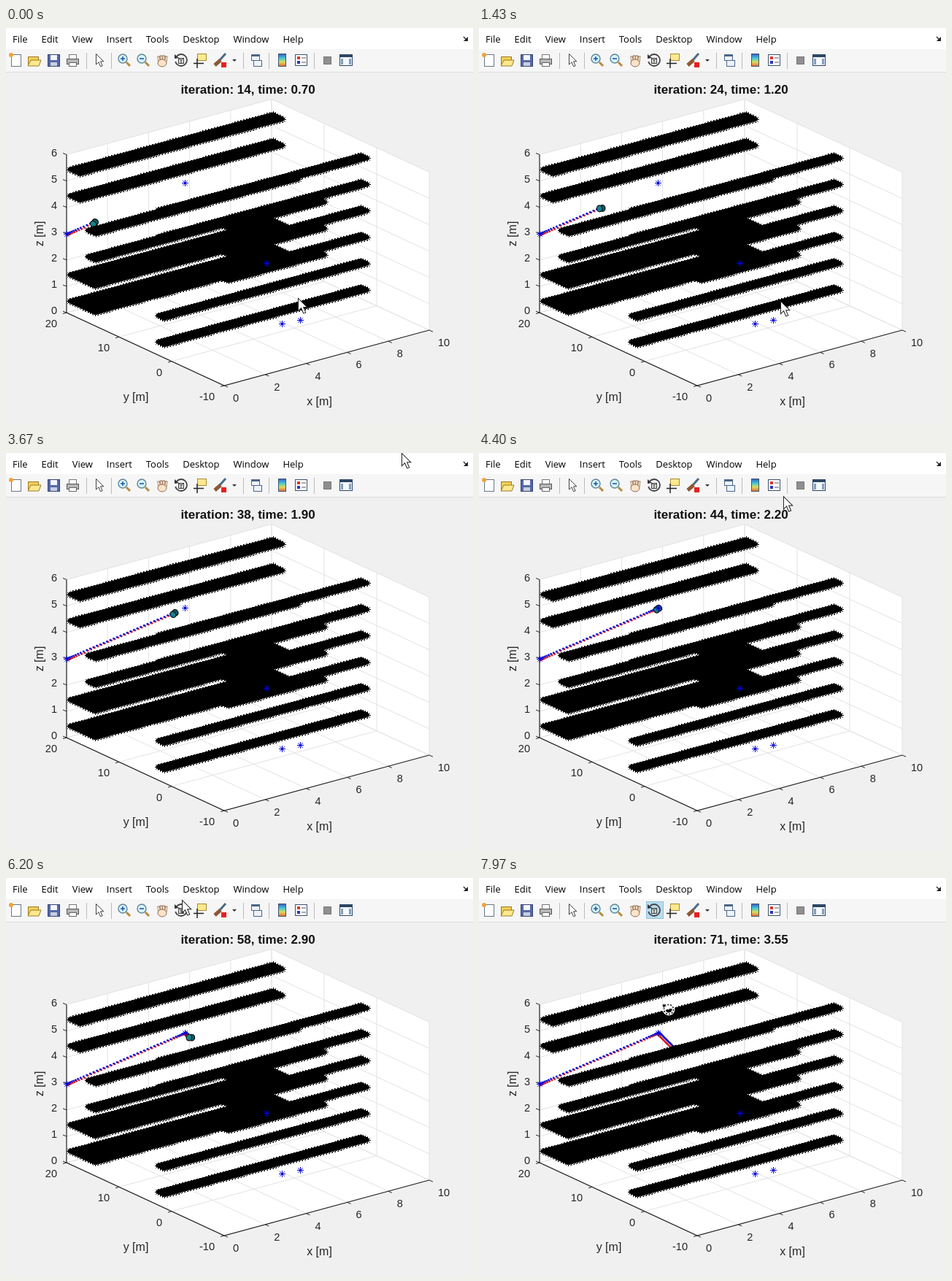
Write an HTML page with a canvas that moves like this. It is 640 px wide and 544 px high and loops after 8000 ms.

```html
<!DOCTYPE html>
<html lang="en">
<head>
<meta charset="utf-8">
<title>3D path simulation</title>
<style>
html, body { margin: 0; width: 100%; height: 100%; overflow: hidden; background: #f0f0f0; }
canvas { display: block; }
</style>
</head>
<body>
<canvas id="stage" width="640" height="544"></canvas>
<script>
const W = 640, H = 544, LOOP = 8000;
const ctx = document.getElementById('stage').getContext('2d');
const SANS = '"Liberation Sans", Arial, sans-serif';
const INK = '#262626', BLUE = '#0000e0', GRID = '#e2e2e2';

function layer(paint) {
  const c = document.createElement('canvas');
  c.width = W;
  c.height = H;
  paint(c.getContext('2d'));
  return c;
}

function line(g, color, width, ...pts) {
  g.strokeStyle = color;
  g.lineWidth = width;
  g.beginPath();
  pts.forEach(([x, y]) => g.lineTo(x, y));
  g.stroke();
}

function poly(g, fill, stroke, width, ...pts) {
  g.beginPath();
  pts.forEach(([x, y]) => g.lineTo(x, y));
  g.closePath();
  g.fillStyle = fill;
  g.fill();
  if (!stroke) return;
  g.strokeStyle = stroke;
  g.lineWidth = width;
  g.stroke();
}

function rect(g, fill, stroke, x, y, w, h) {
  g.fillStyle = fill;
  g.fillRect(x, y, w, h);
  if (!stroke) return;
  g.strokeStyle = stroke;
  g.lineWidth = 1;
  g.strokeRect(x + .5, y + .5, w - 1, h - 1);
}

function disc(g, fill, stroke, width, x, y, rx, ry = rx, turn = 0) {
  g.beginPath();
  g.ellipse(x, y, rx, ry, turn, 0, 7);
  if (fill) { g.fillStyle = fill; g.fill(); }
  if (stroke) { g.strokeStyle = stroke; g.lineWidth = width; g.stroke(); }
}

function text(g, str, x, y, font, align = 'left', base = 'middle', color = INK) {
  g.font = font;
  g.textAlign = align;
  g.textBaseline = base;
  g.fillStyle = color;
  g.fillText(str, x, y);
}

function star(g, x, y, r, color) {
  for (let i = 0; i < 4; i++) {
    const a = i * Math.PI / 4, dx = r * Math.cos(a), dy = r * Math.sin(a);
    line(g, color, 1, [x - dx, y - dy], [x + dx, y + dy]);
  }
}

function arrow(g, x, y, size) {
  g.save();
  g.translate(x, y);
  g.scale(size, size);
  poly(g, '#fff', '#222', 1, [0, 0], [0, 17], [4, 13], [7, 20], [10, 19], [7, 12], [12, 12]);
  g.restore();
}

// Axes coordinates to stage pixels
const project = (x, y, z) =>
  [299 + 28.1 * x - 7.2 * (y + 10), 490 - 7.6 * x - 3.33 * (y + 10) - 36.1 * z];

function drawMenu(g) {
  rect(g, '#fff', null, 0, 0, W, 29);
  rect(g, '#f6f6f6', null, 0, 29, W, 31);
  line(g, '#dcdcdc', 1, [0, 60.5], [W, 60.5]);
  let x = 9;
  for (const name of ['File', 'Edit', 'View', 'Insert', 'Tools', 'Desktop', 'Window', 'Help']) {
    text(g, name, x, 19.5, '13px "Open Sans", "Noto Sans", sans-serif', 'left', 'alphabetic', '#000');
    x += g.measureText(name).width + 19;
  }
  line(g, '#222', 1.2, [627, 12], [631, 16]);
  poly(g, '#222', null, 0, [633, 12], [633, 18], [627, 18]);
}

function zoom(g, plus) {
  line(g, '#b98a3c', 3, [3, 3], [8, 8]);
  disc(g, '#d9f1f7', '#5c8798', 1.4, -2, -2, 6);
  line(g, '#1b5fae', 1.6, [-5, -2], [1, -2]);
  if (plus) line(g, '#1b5fae', 1.6, [-2, -5], [-2, 1]);
}

// Each icon is drawn around its own centre
const ICONS = {
  page(g) {
    rect(g, '#fff', '#678', -6, -8, 14, 17);
    disc(g, '#f0a33a', null, 0, -6, -7, 3);
  },
  folder(g) {
    rect(g, '#f3cf58', '#9a7c25', -9, -5, 15, 13);
    poly(g, '#ffe88e', '#9a7c25', 1, [-5, 0], [9, 0], [6, 8], [-9, 8]);
  },
  disk(g) {
    rect(g, '#5668a8', '#34426f', -8, -8, 17, 17);
    rect(g, '#f4f6ff', null, -4, -7, 9, 7);
    rect(g, '#c7cee0', null, -4, 3, 9, 5);
  },
  printer(g) {
    rect(g, '#fff', '#777', -5, -8, 11, 9);
    rect(g, '#b6b7b8', '#555', -8, -2, 17, 8);
    rect(g, '#fff', '#666', -5, 3, 11, 6);
  },
  pointer: g => arrow(g, -4.5, -8.5, .86),
  zoomIn: g => zoom(g, true),
  zoomOut: g => zoom(g, false),
  hand(g) {
    for (let i = 0; i < 4; i++) line(g, '#8a6a50', 3.4, [i * 3 - 4, 2], [i * 3.6 - 5, -7 + Math.abs(i - 1.5)]);
    for (let i = 0; i < 4; i++) line(g, '#fbe3c9', 2, [i * 3 - 4, 2], [i * 3.6 - 5, -6 + Math.abs(i - 1.5)]);
    disc(g, '#fbe3c9', '#8a6a50', 1, 0, 4, 6, 5);
  },
  rotate(g) {
    rect(g, '#d5d8d4', '#444', -4, -3, 8, 8);
    line(g, '#444', 1, [-4, -3], [0, 0], [4, -3]);
    line(g, '#444', 1, [0, 0], [0, 5]);
    g.lineWidth = 1.8;
    g.beginPath();
    g.arc(0, 0, 8, -2.4, 2.9);
    g.stroke();
    poly(g, '#333', null, 0, [-9, -8], [-9, -2], [-3, -3]);
  },
  dataTip(g) {
    rect(g, '#ffe98f', '#a58c35', -4, -9, 13, 10);
    line(g, '#222', 1.5, [-9, 4.5], [5, 4.5]);
    line(g, '#222', 1.5, [-4, -2], [-4, 11]);
  },
  brush(g) {
    line(g, '#4e6a86', 3, [9, -9], [1, 0]);
    line(g, '#8f5833', 5, [2, 0], [-6, 7]);
    rect(g, '#e62020', null, 3, 3, 7, 7);
    poly(g, '#333', null, 0, [18, -1], [24, -1], [21, 2]);
  },
  link(g) {
    rect(g, '#eef3fa', '#4b6687', -7, -8, 12, 9);
    rect(g, '#4b6687', null, -7, -8, 12, 3);
    rect(g, '#eef3fa', '#4b6687', -4, 0, 12, 9);
  },
  colorbar(g) {
    const shade = g.createLinearGradient(0, -8, 0, 8);
    ['#3a62c8', '#3fc8d8', '#dddc55', '#e66d3c'].forEach((c, i) => shade.addColorStop(i / 3, c));
    rect(g, shade, '#3c5470', -5, -9, 11, 18);
  },
  legend(g) {
    rect(g, '#fff', '#3c5470', -8, -8, 17, 16);
    ['#d33', '#33b'].forEach((c, i) => {
      rect(g, c, null, -5, i * 6 - 5, 4, 4);
      line(g, '#555', 1, [1, i * 6 - 3], [7, i * 6 - 3]);
    });
  },
  square: g => rect(g, '#8f8f8f', '#777', -5, -5, 11, 11),
  panel(g) {
    rect(g, '#f6f8fb', '#2d4663', -9, -8, 18, 16);
    rect(g, '#2d4663', null, -9, -8, 18, 4);
    rect(g, '#7f9fbd', null, -7, -2, 3, 8);
    rect(g, '#7f9fbd', null, 4, -2, 3, 8);
  }
};

function drawIcons(g) {
  const groups = {
    13: 'page folder disk printer', 128: 'pointer', 162: 'zoomIn zoomOut hand rotate dataTip brush',
    343: 'link', 378: 'colorbar legend', 440: 'square panel'
  };
  for (const left in groups) {
    if (left > 13) line(g, '#bbb', 1, [left - 17.5, 34], [left - 17.5, 56]);
    groups[left].split(' ').forEach((name, i) => {
      g.save();
      g.translate(+left + i * 26, 44);
      ICONS[name](g);
      g.restore();
    });
  }
}

function drawAxes(g) {
  const P = project, font = '14.6px ' + SANS, big = '16px ' + SANS;
  poly(g, '#fff', null, 0, P(0, -10, 0), P(10, -10, 0), P(10, -10, 6), P(10, 20, 6), P(0, 20, 6), P(0, 20, 0));
  for (let x = 0; x <= 10; x += 2) line(g, GRID, 1, P(x, -10, 0), P(x, 20, 0), P(x, 20, 6));
  for (let y = -10; y <= 20; y += 10) line(g, GRID, 1, P(0, y, 0), P(10, y, 0), P(10, y, 6));
  for (let z = 0; z <= 6; z++) line(g, GRID, 1, P(0, 20, z), P(10, 20, z), P(10, -10, z));
  line(g, INK, 1.2, P(0, 20, 6), P(0, 20, 0), P(0, -10, 0), P(10, -10, 0));

  const tick = ([x, y], dx, dy, label, lx, ly, align) => {
    line(g, INK, 1, [x, y], [x + dx, y + dy]);
    text(g, label, x + lx, y + ly, font, align);
  };
  for (let z = 0; z <= 6; z++) tick(P(0, 20, z), -5, -2, z, -13, -2, 'right');
  for (let y = -10; y <= 20; y += 10) tick(P(0, y, 0), -5, 1.4, y, -13, 16, 'right');
  for (let x = 0; x <= 10; x += 2) tick(P(x, -10, 0), 5, 2.2, x, 12, 18, 'left');

  text(g, 'y [m]', 178, 507, big, 'center');
  text(g, 'x [m]', 429.5, 513, big, 'center');
  g.save();
  g.translate(47, 282);
  g.rotate(-Math.PI / 2);
  text(g, 'z [m]', 0, 0, big, 'center');
  g.restore();
}

// A flat block of overlapping black asterisks
function slab(g, x0, x1, y0, y1, z) {
  const corners = [[x0, y0], [x1, y0], [x1, y1], [x0, y1]].map(([x, y]) => project(x, y, z));
  g.lineJoin = 'round';
  poly(g, '#000', '#000', 5.5, ...corners);
  const cols = Math.round((x1 - x0) * 7), rows = Math.ceil((y0 - y1) * 2);
  for (let r = 0; r <= rows; r++)
    for (let c = 0; c <= cols; c++) {
      const p = project(x0 + (x1 - x0) * c / cols, y0 + (y1 - y0) * r / rows, z);
      star(g, Math.round(p[0]) + .5, Math.round(p[1]) + .5, 4.5, '#000');
    }
}

function drawObstacles(g) {
  const stack = (count, z, ...area) => {
    for (let i = 0; i < count; i++) slab(g, ...area, z + i);
  };
  stack(2, 4.5, 0, 9.9, 19.4, 17.5);
  stack(2, 2.5, 0, 9.9, 16, 14.5);
  stack(6, .5, 0, 9.9, 2.6, 1.4);
  stack(2, .5, 0, 9.9, 19.4, 14.6);
  stack(3, 1.2, 5, 9.7, 9.9, 8.7);

  g.setLineDash([2, 3]);
  line(g, '#aaa', 1, [150, 315.5], [293, 277]);
  line(g, '#aaa', 1, [124, 358.5], [293, 312.5]);
}

const backdrop = layer(g => {
  rect(g, '#f0f0f0', null, 0, 0, W, H);
  drawMenu(g);
  drawAxes(g);
});
const obstacles = layer(drawObstacles);
const icons = layer(drawIcons);

// Steady count with a short lag while the pointer leaves the window
const iteration = t => 14.05 + 7.15 * t - 2 * Math.exp(-(((t - 3.8) / .8) ** 2));

// Distance covered when speeding up, cruising and slowing down
const RAMP = 12, LEG = 47.3;
function travel(n, speed) {
  const rampUp = k => k < RAMP ? k * k / (2 * RAMP) : k - RAMP / 2;
  n = Math.max(0, Math.min(LEG, n));
  return speed * (n < LEG / 2 ? rampUp(n) : LEG - RAMP - rampUp(LEG - n));
}

function flight(n) {
  const first = travel(n, 4.62), second = travel(n - LEG, 1.2);
  return [83 + first + second, 282 - first * .43 + second];
}

function drawTrail(step) {
  const dots = (color, r, shift) => {
    for (let i = 0; i <= step; i++) {
      const [x, y] = flight(i), [dx, dy] = shift(i);
      disc(ctx, color, null, 0, x + dx, y + dy, r);
    }
  };
  dots('#d81820', 1.4, i => i > LEG ? [-2, 1.5] : [1.5, i < RAMP ? 1.8 : .9]);
  dots('#1a1ad0', 1.5, i => i > LEG ? [.8, -.5] : [0, 0]);
}

function drawDrone(step) {
  const [x, y] = flight(step);
  const turn = -.3 + Math.sin(step * .8) * .5;
  [['#0d5e68', 2], ['#16808c', -2]].forEach(([color, d]) =>
    disc(ctx, color, '#111', 1.2, x + 1 + d * Math.cos(turn), y + 1 + d * Math.sin(turn), 3.8, 4.4, turn));
}

// Time and tip position where the pointer pauses or turns
const POINTER = [[0, 400, 370], [1.43, 413, 374], [2.73, 484, 314], [3.67, 542, 0],
  [5.17, 282, 123], [6.2, 241, 30], [7.5, 260, 180]];

function pointerAt(t) {
  const i = POINTER.findIndex(p => p[0] > t);
  if (i < 0) return POINTER.at(-1).slice(1);
  const [t0, x0, y0] = POINTER[i - 1], [t1, x1, y1] = POINTER[i];
  const f = (t - t0) / (t1 - t0), ease = f * f * (3 - 2 * f);
  return [x0 + (x1 - x0) * ease, y0 + (y1 - y0) * ease];
}

function drawPointer(t) {
  const [x, y] = pointerAt(t);
  if (t < 6.2 || y < 62) return arrow(ctx, x + .5, y + .5, 1.02);
  disc(ctx, null, '#fff', 4, x, y, 6.5);
  ctx.setLineDash([2, 2]);
  disc(ctx, null, '#111', 1.6, x, y, 6.5);
  ctx.setLineDash([]);
  poly(ctx, '#111', '#fff', .6, [x - 9, y - 7], [x - 3, y - 7], [x - 7, y - 1]);
}

function render(t) {
  const step = Math.floor(iteration(t));
  ctx.drawImage(backdrop, 0, 0);
  if (t > 6.24) rect(ctx, '#b9dcef', '#8fc0dd', 229, 32, 24, 24);
  ctx.drawImage(icons, 0, 0);
  text(ctx, `iteration: ${step}, time: ${(step * .05).toFixed(2)}`, 331.5, 89.5,
    'bold 17px ' + SANS, 'center', 'alphabetic', '#111');
  drawTrail(step);
  drawDrone(step);
  ctx.drawImage(obstacles, 0, 0);
  for (const [x, y] of [[83, 282], [245, 212], [357, 322], [378, 405], [403, 400]])
    star(ctx, x + .5, y + .5, 4.5, BLUE);
  drawPointer(t);
}

const start = performance.now();
function tick() {
  render((performance.now() - start) % LOOP / 1000);
  requestAnimationFrame(tick);
}
tick();
</script>
</body>
</html>
```
